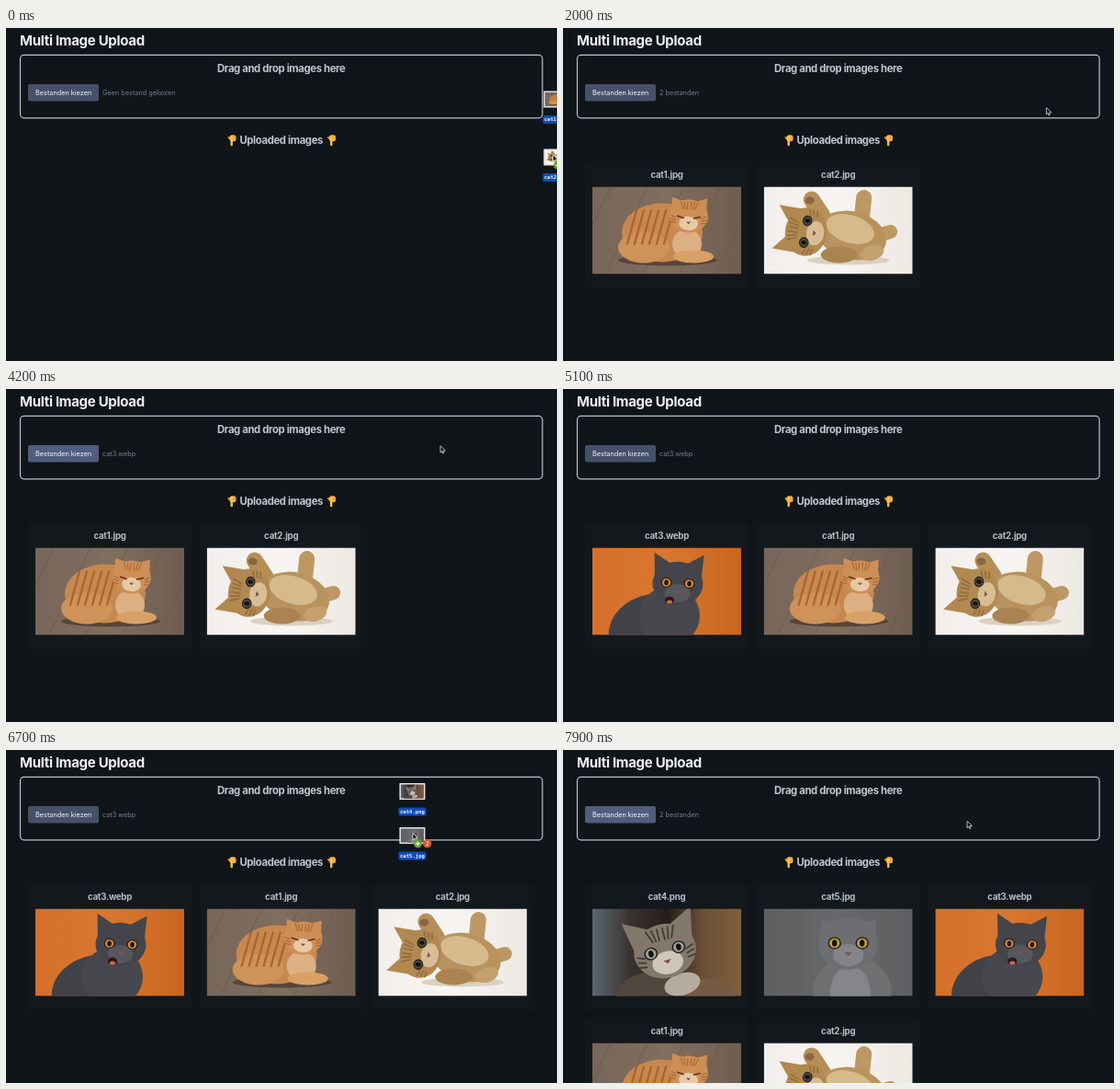
Recreate the animation shown at these times as an HTML page with a canvas. Size 600 by 362 pixels, loop 8000 ms.

```html
<!DOCTYPE html>
<html lang="en">
<head>
<meta charset="utf-8">
<title>Multi Image Upload</title>
<style>
  html, body { margin: 0; width: 100%; height: 100%; overflow: hidden; background: #10151a; }
  canvas { display: block; width: 600px; height: 362px; }
</style>
</head>
<body>
<canvas id="stage"></canvas>
<script>
const W = 600, H = 362, LOOP = 8000;
const SANS = 'Inter, "Open Sans", sans-serif';
const MONO = '"DejaVu Sans Mono", "Liberation Mono", monospace';
const HEAD = '700 11.3px ' + SANS, SMALL = '400 7.3px ' + SANS;
const stage = document.getElementById('stage');
const dpr = window.devicePixelRatio || 1;
stage.width = W * dpr;
stage.height = H * dpr;
const c = stage.getContext('2d');

// ---- drawing helpers ----
function text(str, x, y, font, color, align = 'left', tracking = '0px') {
  c.font = font;
  c.letterSpacing = tracking;
  c.textAlign = align;
  c.fillStyle = color;
  c.fillText(str, x, y);
}

function box(x, y, w, h, r, color) {
  c.beginPath();
  c.roundRect(x, y, w, h, r);
  c.fillStyle = color;
  c.fill();
}

function oval(x, y, rx, ry, color, turn = 0) {
  c.beginPath();
  c.ellipse(x, y, rx, ry, turn, 0, Math.PI * 2);
  c.fillStyle = color;
  c.fill();
}

function line(x1, y1, x2, y2, width, color) {
  c.beginPath();
  c.moveTo(x1, y1);
  c.lineTo(x2, y2);
  c.lineWidth = width;
  c.lineCap = 'round';
  c.strokeStyle = color;
  c.stroke();
}

function poly(points, color) {
  c.beginPath();
  points.forEach(p => c.lineTo(...p));
  c.closePath();
  c.fillStyle = color;
  c.fill();
}

function backdrop(...colors) {
  const g = c.createLinearGradient(0, 0, 162, 0);
  colors.forEach((color, i) => g.addColorStop(i / (colors.length - 1), color));
  c.fillStyle = g;
  c.fillRect(0, 0, 162, 95);
}

// cat head of radius r; the ears' tips lie at (+-earX, -earY) radii
function head(x, y, r, turn, { fur, muzzle, iris, earX = 1, earY = 1.3, stripe }) {
  c.save();
  c.translate(x, y);
  c.rotate(turn);
  c.scale(r, r);
  for (const s of [-1, 1]) poly([[s, 0], [s * earX, -earY], [s * 0.25, -0.8]], fur);
  oval(0, 0, 1.1, 0.95, fur);
  oval(0, 0.42, 0.55, 0.4, muzzle);
  for (const s of [-1, 1]) {
    if (stripe) for (let i = 0; i < 3; i++) {
      line(s * (0.1 + i * 0.2), -0.8, s * (0.1 + i * 0.12), -0.4, 0.06, stripe);
      line(s, i * 0.18, s * 0.75, 0.1 + i * 0.15, 0.06, stripe);
    }
    if (iris) {
      oval(s * 0.5, -0.02, 0.24, 0.22, '#201c1a');
      oval(s * 0.5, -0.02, 0.19, 0.18, iris);
      oval(s * 0.5, -0.02, 0.09, 0.12, '#15120f');
    } else line(s * 0.65, 0.02, s * 0.3, 0.12, 0.08, '#5b3519');
  }
  poly([[-0.14, 0.32], [0.14, 0.32], [0, 0.46]], '#7d5450');
  c.restore();
}

// ---- pictures, each on a 162 x 95 field ----
const pics = {
  'cat1.jpg'() {
    backdrop('#77675a', '#806e5e', '#6e5e50');
    for (let x = 0; x < 200; x += 40) line(x - 25, 95, x + 20, 0, 0.7, '#66574a');
    oval(82, 80, 54, 6, '#54463a');
    oval(76, 50, 44, 32, '#c78850');
    oval(56, 66, 28, 17, '#cf9259');
    for (let x = 42; x < 90; x += 8) line(x + 6, 26, x - 4, 62, 2.4, '#a9662f');
    oval(103, 62, 16, 16, '#dcb083');
    oval(110, 76, 22, 7, '#d9a066');
    head(105, 32, 19, 0.05, { fur: '#cd8f56', muzzle: '#e6c9a5', earY: 1.05, stripe: '#a9662f' });
  },
  'cat2.jpg'() {
    backdrop('#f1eeeb', '#f7f5f2', '#ece8e2');
    oval(92, 80, 45, 5, '#d9d0c2');
    line(106, 40, 109, 12, 17, '#bd9862');
    line(120, 54, 138, 49, 15, '#bd9862');
    line(64, 32, 52, 14, 18, '#b68f57');
    oval(96, 53, 38, 26, '#b8935d', 0.25);
    oval(94, 46, 27, 15, '#d6ba8c', 0.3);
    oval(82, 74, 20, 9, '#a98350');
    oval(118, 72, 13, 8, '#c3a06d', -0.3);
    oval(50, 15, 5, 4, '#8c6440');
    head(46, 49, 24, -1.4, { fur: '#b18850', muzzle: '#d8bd94', iris: '#4b4a40', earY: 1.4, stripe: '#8f6a38' });
  },
  'cat3.webp'() {
    backdrop('#d4702a', '#d97630', '#c8651f');
    oval(64, 88, 47, 37, '#424348', -0.3);
    oval(84, 74, 33, 32, '#47484d');
    head(93, 39, 25, 0.05, { fur: '#44454a', muzzle: '#56575d', iris: '#dc862b', earX: 1.08 });
    oval(84, 57, 5, 4, '#2a1718');
    oval(84, 59, 3, 2, '#d8644c');
  },
  'cat4.png'() {
    backdrop('#5c6773', '#3a3431', '#241d19', '#6d5138', '#80603c');
    oval(70, 100, 46, 32, '#51473f');
    oval(126, 98, 30, 22, '#765b43');
    oval(98, 82, 20, 12, '#b5aca0', -0.3);
    head(79, 46, 31, -0.25, { fur: '#82786c', muzzle: '#cfc6b9', iris: '#97a198', earX: 1.25, stripe: '#453e38' });
  },
  'cat5.jpg'() {
    backdrop('#5e5f61', '#67686a', '#5e5f61');
    oval(96, 90, 43, 38, '#6f7072');
    oval(94, 92, 22, 30, '#858689');
    head(92, 38, 30, 0, { fur: '#6d6e71', muzzle: '#838487', iris: '#b9a03a', earY: 0.85 });
  }
};

function picture(name, x, y, w, h) {
  c.save();
  c.beginPath();
  c.rect(x, y, w, h);
  c.clip();
  c.translate(x, y);
  c.scale(w / 162, h / 95);
  pics[name]();
  c.restore();
}

// ---- timeline: files are dragged in, dropped, then listed ----
const uploads = [
  { enter: 0, drop: 900, shown: 1700, leave: 1700, start: [596, 138], spot: [472, 61.5],
    names: ['cat1.jpg', 'cat2.jpg'], gap: 63, dx: 4 },
  { enter: 2500, drop: 3600, shown: 4400, leave: 4600, start: [681, 140], spot: [473, 62],
    names: ['cat3.webp'], gap: 0, dx: 1.5 },
  { enter: 6100, drop: 7000, shown: 7700, leave: LOOP, start: [680, 128], spot: [440, 77.5],
    names: ['cat4.png', 'cat5.jpg'], gap: 48, dx: -0.5 }
];
const EXIT = 500;

const mix = (a, b, k) => a + (b - a) * k;
const easeOut = k => 1 - (1 - k) ** 4;
const smooth = k => k * k * (3 - 2 * k);

function pointerAt(u, t) {
  const k = Math.min(1, (t - u.enter) / (u.drop - u.enter));
  const out = Math.max(0, (t - u.leave) / EXIT) ** 2;
  return [mix(u.start[0], u.spot[0], easeOut(k)) + 150 * out,
          mix(u.start[1], u.spot[1], smooth(k)) + 70 * out];
}

// ---- page parts ----
function hand(x) {
  line(x + 1, 119, x + 3, 121, 2, '#e09a30');
  box(x + 2, 116.3, 7, 7, 2.5, '#f2ae38');
  box(x + 3, 117, 2.4, 11.2, 1.2, '#fbc145');
}

function card(name, i) {
  const x = 24 + (i % 3) * 186.7, y = 146 + Math.floor(i / 3) * 146;
  box(x, y, 178, 137, 2, '#13181d');
  text(name, x + 89, y + 17, '700 9.7px ' + SANS, '#b6bcc6', 'center', '-0.25px');
  picture(name, x + 8, y + 26.5, 162, 95);
}

function arrow(x, y) {
  c.save();
  c.translate(x, y);
  poly([[0, 0], [0, 7], [1.6, 5.6], [2.7, 8], [3.8, 7.5], [2.8, 5.2], [5, 5]], '#0b0b0b');
  c.strokeStyle = '#e8e8e8';
  c.lineWidth = 0.8;
  c.stroke();
  c.restore();
}

function thumb(name, x, y) {
  box(x - 14, y - 9, 28, 18, 0.5, '#e4e4e4');
  picture(name, x - 12.7, y - 7.7, 25.4, 15.4);
  const w = name.length * 3.36 + 3.2;
  box(x - w / 2, y + 17.6, w, 8.8, 2, '#0b4cbb');
  text(name, x, y + 23.9, 'bold 5.6px ' + MONO, '#f2f5fb', 'center');
}

function badges(x, y, count) {
  oval(x, y, 4.6, 4.6, '#5fa52c');
  line(x - 2, y, x + 2, y, 1.2, '#fff');
  line(x, y - 2, x, y + 2, 1.2, '#fff');
  if (count > 1) {
    oval(x + 10.3, y, 4.6, 4.6, '#dc5630');
    text(count, x + 10.3, y + 2.2, '6px ' + SANS, '#fff', 'center');
  }
}

function draw(t) {
  c.setTransform(dpr, 0, 0, dpr, 0, 0);
  c.fillStyle = '#10151a';
  c.fillRect(0, 0, W, H);

  const active = uploads.find(u => t >= u.enter && t < u.leave + EXIT);
  const [x, y] = active ? pointerAt(active, t) : [W, H];
  const dragging = active && t < active.drop;
  const hover = active && !dragging && x < 576 && y > 60.5 && y < 80;
  const last = uploads.filter(u => t >= u.drop).pop();
  const label = !last ? 'Geen bestand gekozen'
    : last.names.length > 1 ? last.names.length + ' bestanden' : last.names[0];

  text('Multi Image Upload', 15, 18.5, '700 15px ' + SANS, '#f0f2f4', 'left', '-0.3px');
  c.beginPath();
  c.roundRect(15.5, 29.4, 568.6, 68.4, 4);
  c.strokeStyle = '#bcc2c9';
  c.lineWidth = 1.2;
  c.stroke();
  text('Drag and drop images here', 299.7, 48.3, HEAD, '#c0c6d0', 'center', '-0.35px');
  box(24, 61, 77, 18.5, 2, hover ? '#505d7e' : '#465069');
  text('Bestanden kiezen', 32, 73.2, SMALL, '#f4f6f9');
  text(label, 105, 73.2, SMALL, '#747e8e');

  hand(241.5);
  text('Uploaded images', 299.7, 126.2, HEAD, '#c0c6d0', 'center', '-0.35px');
  hand(350);
  uploads.filter(u => t >= u.shown).reverse().flatMap(u => u.names).forEach(card);

  if (!active) return;
  if (dragging) active.names.forEach((name, i, all) =>
    thumb(name, x + active.dx, y + 2.5 - (all.length - 1 - i) * active.gap));
  arrow(x, y);
  if (dragging) badges(x + 5.5, y + 11.3, active.names.length);
}

function tick() {
  draw(performance.now() % LOOP);
  requestAnimationFrame(tick);
}
tick();
</script>
</body>
</html>
```
